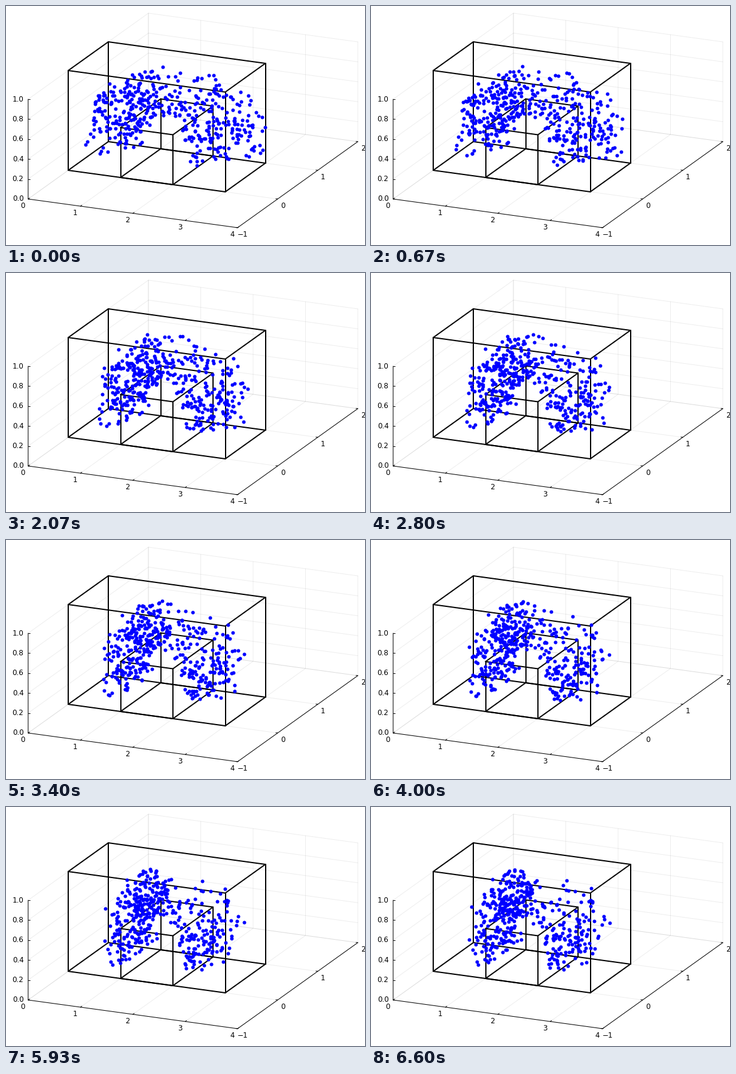
These frames come from a looping animation (600x400 px, 6670 ms). A matplotlib script:

```python
import numpy as np
import matplotlib.pyplot as plt
from matplotlib.animation import FuncAnimation
from matplotlib.collections import LineCollection

W, H, DPI = 600, 400, 100
FRAMES, LOOP = 100, 6670
PX = 72 / DPI
COUNT = 450

ORIGIN = np.array([37, 323])
EX, EY, EZ = np.array([87.5, 12]), np.array([67, -48]), np.array([0, -167])


def project(x, y, z):
    coords = np.stack([x, np.add(y, 1), z], axis=-1)
    return ORIGIN + coords @ np.array([EX, EY, EZ])


def box_edges(x, y, z):
    edges = []
    for a in (0, 1):
        for b in (0, 1):
            edges.append([project(x[a], y[b], z[0]), project(x[a], y[b], z[1])])
            edges.append([project(x[a], y[0], z[b]), project(x[a], y[1], z[b])])
            edges.append([project(x[0], y[a], z[b]), project(x[1], y[a], z[b])])
    return edges


def grid_lines():
    lines = []
    for x in range(5):
        lines.append([project(x, -1, 0), project(x, 2, 0), project(x, 2, 1)])
    for y in range(-1, 3):
        lines.append([project(4, y, 0), project(0, y, 0), project(0, y, 1)])
    for z in np.linspace(0, 1, 6):
        lines.append([project(0, -1, z), project(0, 2, z), project(4, 2, z)])
    return lines


fig = plt.figure(figsize=(W / DPI, H / DPI), dpi=DPI, facecolor="white")
ax = fig.add_axes([0, 0, 1, 1])
ax.set_xlim(0, W)
ax.set_ylim(H, 0)
ax.axis("off")


def add_lines(lines, width, color, z):
    ax.add_collection(LineCollection(lines, linewidths=width * PX, colors=color,
                                     zorder=z, capstyle="round"))


def label(pos, text, ha="center"):
    ax.text(*pos, text, ha=ha, va="center", family="DejaVu Sans", size=12 * PX)


def draw_axes():
    lines = [[project(0, -1, 1), project(0, -1, 0), project(4, -1, 0), project(4, 2, 0)]]
    for x in range(5):
        p = project(x, -1, 0)
        lines.append([p, p + 0.035 * EY])
        label(p + (-9, 12), str(x))
    for y in range(-1, 3):
        p = project(4, y, 0)
        lines.append([p, p - 0.035 * EX])
        label(p + (8.5, 12), str(y).replace("-", "\u2212"))
    for z in np.linspace(0, 1, 6):
        p = project(0, -1, z)
        lines.append([p, p + (3, 0)])
        label(p + (-7.5, 0), f"{z:.1f}", "right")
    add_lines(lines, 1, "black", 2)


# Each particle lives in an arch over the inner box: an angle along the arch
# (0 = right foot, pi = left foot) and a point in its cross-section.
rng = np.random.default_rng(7)
v = np.pi * rng.uniform(0.07, 0.93, COUNT)
theta0 = v - 0.15 * np.sin(2 * v)
radius = 0.5 * rng.random(COUNT) ** 0.45
phase = rng.uniform(0, 2 * np.pi, COUNT)
spin = rng.uniform(-2, 2, COUNT)
settle = rng.random(COUNT) ** 0.5


def rounded(value):
    return np.sign(value) * np.abs(value) ** 0.7


def positions(t):
    s = 1 - (1 - t) ** 2
    # Stream from right to left, parting above the right foot.
    drift = np.sin(theta0) * (0.35 * np.sin(3 * (theta0 - np.pi / 5)) + 0.15)
    theta = theta0 + s * drift
    y = 0.5 + radius * np.sin(phase + spin * t)
    depth = 0.5 + radius * np.cos(phase + spin * t)
    # Near both feet the particles settle against the inner box.
    depth *= 1 - 0.95 * s * settle * np.cos(theta) ** 2
    c, h = rounded(np.cos(theta)), rounded(np.sin(theta))
    reach = np.where(c > 0, 1.45, 1.0)
    return project(1.5 + c * (0.5 + reach * depth), y, h * (0.5 + 0.45 * depth))


add_lines(grid_lines(), 1, (0, 0, 0, 0.07), 1)
draw_axes()
add_lines(box_edges((0, 3), (0, 1), (0, 1)) + box_edges((1, 2), (0, 1), (0, 0.5)),
          2, "black", 3)
dots, = ax.plot([], [], "o", color="#0000ff", ms=6 * PX, mew=0, zorder=4)


def update(i):
    dots.set_data(*positions(i / (FRAMES - 1)).T)
    return dots,


anim = FuncAnimation(fig, update, frames=FRAMES, interval=LOOP / FRAMES,
                     repeat=True, repeat_delay=0)
plt.show()
```
